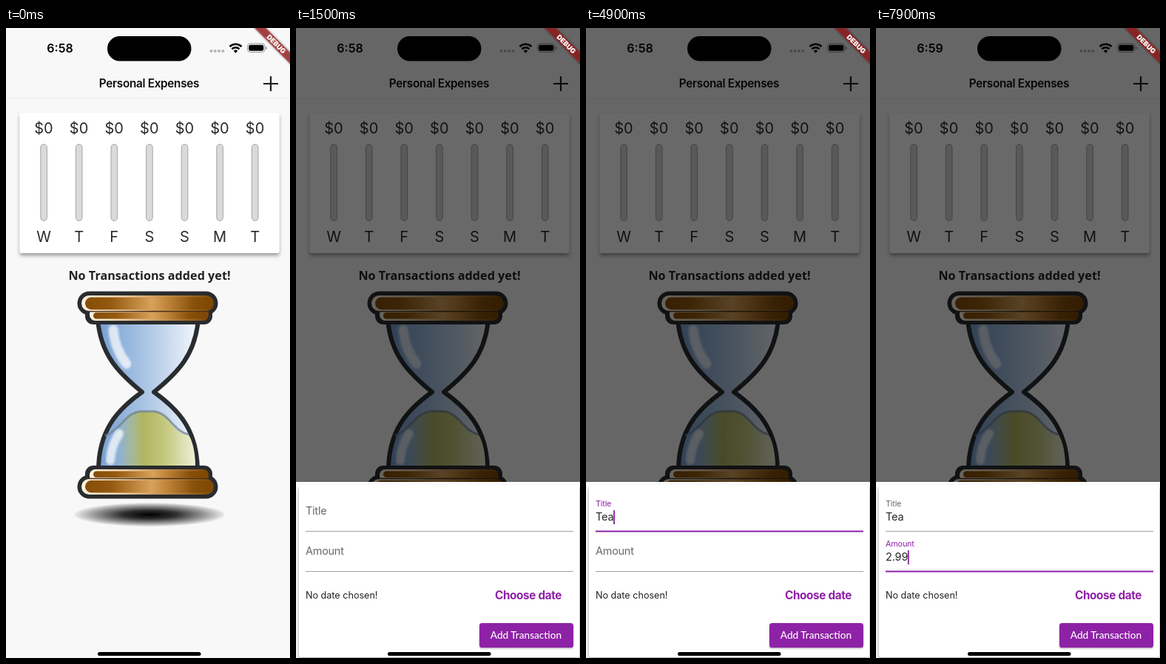
Animation, 384 px wide and 848 px high, one loop 8000 ms. Source, as an HTML page:

```html
<!DOCTYPE html>
<html lang="en">
<head>
<meta charset="utf-8">
<title>Personal Expenses</title>
<style>
  html, body { margin: 0; width: 100%; height: 100%; overflow: hidden; background: #f8f8f8; }
  svg { display: block; width: 384px; height: 848px; }
  text { font-family: Inter, Roboto, sans-serif; fill: #222; white-space: pre; }
  .mid { text-anchor: middle; }
  .day { font-size: 20px; fill: #2a2a2a; }
  .input { font-size: 14.4px; letter-spacing: -.1px; fill: #262626; }
  .label { font-size: 14.4px; letter-spacing: -.2px; }
  .purple { fill: #8e20a6; }
  .ink { stroke: #292c2f; stroke-width: 6; stroke-linejoin: round; }
</style>
</head>
<body>
<svg viewBox="0 0 384 848" xmlns="http://www.w3.org/2000/svg">
  <defs>
    <linearGradient id="wood">
      <stop offset="0" stop-color="#854d08"/><stop offset=".2" stop-color="#95590f"/>
      <stop offset=".52" stop-color="#d8a25c"/><stop offset=".64" stop-color="#c0853a"/>
      <stop offset=".85" stop-color="#87500a"/><stop offset="1" stop-color="#7d4703"/>
    </linearGradient>
    <linearGradient id="rim">
      <stop offset="0" stop-color="#fff3e2"/><stop offset=".3" stop-color="#ecd0a8"/>
      <stop offset=".6" stop-color="#c99452"/><stop offset="1" stop-color="#7d4703"/>
    </linearGradient>
    <linearGradient id="glass">
      <stop offset="0" stop-color="#759ed0"/><stop offset=".35" stop-color="#9cbbe0"/>
      <stop offset=".65" stop-color="#c2d5ec"/><stop offset="1" stop-color="#f5f8fc"/>
    </linearGradient>
    <linearGradient id="sand">
      <stop offset=".18" stop-color="#a9b45f" stop-opacity="0"/><stop offset=".45" stop-color="#b0b55f"/>
      <stop offset=".7" stop-color="#c6ca83"/><stop offset="1" stop-color="#eef0d6"/>
    </linearGradient>
    <radialGradient id="floor">
      <stop offset="0"/><stop offset=".35" stop-opacity=".82"/>
      <stop offset=".75" stop-opacity=".36"/><stop offset="1" stop-opacity=".04"/>
    </radialGradient>
    <filter id="lift" x="-10%" y="-10%" width="120%" height="125%">
      <feDropShadow dx="0" dy="3.5" stdDeviation="2.8" flood-opacity=".36"/>
    </filter>
    <filter id="low" x="-10%" y="-20%" width="120%" height="150%">
      <feDropShadow dx="0" dy="1.2" stdDeviation="1" flood-opacity=".32"/>
    </filter>
    <filter id="soft" x="-30%" y="-80%" width="160%" height="260%"><feGaussianBlur stdDeviation="1.5"/></filter>
    <g id="cap">
      <g fill="#292c2f">
        <rect x="107" y="372" width="172" height="27" rx="11"/>
        <rect x="96.5" y="354.5" width="190" height="32" rx="16"/>
      </g>
      <g fill="url(#rim)">
        <rect x="113" y="377" width="161" height="17" rx="8"/>
        <rect x="102" y="360" width="179" height="21" rx="10.5"/>
      </g>
      <path d="M112 381.5H273" stroke="#4a2f10" stroke-width="1.6"/>
      <rect x="118" y="383" width="154" height="8.5" rx="4.2" fill="url(#wood)"/>
      <rect x="107" y="362.5" width="173" height="16.5" rx="8.2" fill="url(#wood)"/>
    </g>
  </defs>

  <rect width="384" height="848" fill="#f8f8f8"/>
  <path d="M0 94.5H384" stroke="#e9e9e9"/>
  <text class="mid" x="193.5" y="80" font-size="15.3" font-weight="600" letter-spacing="-.3" style="fill:#0c0c0c">Personal Expenses</text>
  <path d="M348 75h20M358 65v20" stroke="#1c1c1c" stroke-width="2.2"/>

  <rect x="18.5" y="114" width="351" height="189" rx="3.5" fill="#fff" filter="url(#lift)"/>
  <g id="chart"></g>

  <text class="mid" x="194" y="339" font-size="16.2" font-weight="700" style="font-family:'Open Sans',sans-serif">No Transactions added yet!</text>

  <g>
    <ellipse cx="194" cy="655" rx="102" ry="16" fill="url(#floor)"/>
    <path class="ink" fill="url(#glass)" d="M124 392C128 440 152 464 184 490C150 514 125 542 125 596H259C259 542 234 514 200 490C232 464 256 440 260 392Z"/>
    <path d="M129 548C150 540 160 516 183 515H200C222 518 226 546 247 548Q256 562 256 593H128Q128 566 129 548Z" fill="url(#sand)"/>
    <path d="M134 549C156 540 162 517 183 516H200C222 519 226 543 247 547" fill="none" stroke="#71859a" stroke-width="3" stroke-opacity=".75"/>
    <g fill="none" stroke="#fff" stroke-linecap="round" filter="url(#soft)">
      <path d="M145 406Q147 432 163 452" stroke-width="13" stroke-opacity=".72"/>
      <path d="M153 546Q142 562 141 582" stroke-width="12" stroke-opacity=".72"/>
    </g>
    <use href="#cap"/>
    <use href="#cap" transform="matrix(1 0 0 -1 0 988)"/>
  </g>

  <rect id="scrim" width="384" height="848"/>

  <g id="sheet">
    <rect width="384" height="240" fill="#fcfcfc"/>
    <rect x="4" y="4" width="379" height="232" rx="3.6" fill="#fff" filter="url(#lift)"/>
    <g id="fields"></g>
    <text x="13" y="156.5" font-size="12.6">No date chosen!</text>
    <text class="mid purple" x="314" y="158" font-size="15.3" font-weight="700" letter-spacing="-.35">Choose date</text>
    <rect x="248" y="190" width="127" height="33" rx="3.6" fill="#8e20a6" filter="url(#low)"/>
    <text class="mid" x="311" y="211" font-size="13.6" font-weight="500" style="font-family:Lato,sans-serif;fill:#fff">Add Transaction</text>
  </g>

  <g>
    <text id="clock" class="mid" x="73" y="33" font-size="16" font-weight="600" style="fill:#000">6:58</text>
    <rect x="137" y="11" width="113.5" height="33.5" rx="16.75"/>
    <path d="M277.5 31h18" stroke="#000" stroke-opacity=".27" stroke-width="4" stroke-linecap="round" stroke-dasharray="0 5.3"/>
    <path d="M302.5 25a11.5 11.5 0 0 1 16 0M305.4 28.4a7.2 7.2 0 0 1 10.2 0" fill="none" stroke="#000" stroke-width="2.5"/>
    <path d="M307.8 30.8a4 4 0 0 1 5.4 0L310.5 33.8Z"/>
    <rect x="326.5" y="21" width="23.5" height="11.5" rx="3.6" fill="none" stroke="#000" stroke-opacity=".4"/>
    <rect x="328.2" y="22.7" width="20.1" height="8.1" rx="2.2"/>
    <path d="M351.3 25v4q1.6-.6 1.6-2t-1.6-2" fill-opacity=".45"/>
    <rect x="124" y="840" width="139.5" height="5" rx="2.5"/>
  </g>

  <g transform="translate(387 0) rotate(45)">
    <rect x="-36" y="25.2" width="72" height="10.8" fill-opacity=".5" filter="url(#soft)"/>
    <rect x="-36" y="25.2" width="72" height="10.8" fill="#b71c1c" fill-opacity=".63"/>
    <text class="mid" y="33.9" font-size="9.2" font-weight="900" style="fill:#fff">DEBUG</text>
  </g>
</svg>

<script>
const LOOP = 8000, STEP = 100, SHEET_H = 237;
const $ = id => document.getElementById(id);
const clamp = v => Math.min(1, Math.max(0, v));
const ramp = (t, start, length) => clamp((t - start) / length);
const smooth = u => u * u * (3 - 2 * u);

$('chart').innerHTML = [...'WTFSSMT'].map((day, i) => {
  const x = 51 + i * 47.6;
  return `<text class="day mid" x="${x}" y="141.5">$0</text>
    <rect x="${x - 4.2}" y="156.5" width="8.6" height="103" rx="4.3" fill="#dadada" stroke="#a4a4a4"/>
    <text class="day mid" x="${x}" y="288">${day}</text>`;
}).join('');

// y is the baseline of the resting label, relative to the sheet
const fields = [
  { name: 'Title', y: 44, focus: 2450, blur: 5050, keys: [[4400, 'T'], [4700, 'Te'], [4900, 'Tea']] },
  { name: 'Amount', y: 98, focus: 5050, blur: Infinity, keys: [[6200, '2'], [7100, '2.'], [7600, '2.9'], [7800, '2.99']] }
];

for (const f of fields) {
  const g = document.createElementNS('http://www.w3.org/2000/svg', 'g');
  g.innerHTML = `<path d="M13 ${f.y + 22.5}H375" stroke="#a2a2a2"/>
    <rect class="purple" x="13" y="${f.y + 21.5}" width="362" height="2"/>
    <text class="label">${f.name}</text>
    <text class="input" x="13" y="${f.y + 8}"></text>
    <rect class="purple" y="${f.y - 6}" width="1.8" height="19"/>`;
  $('fields').append(g);
  [, f.line, f.label, f.input, f.cursor] = g.children;
}

function blink(ms) {
  const c = ms % 1000;
  return c <= 500 ? 1 : c < 850 ? 1 - ramp(c, 500, 150) : ramp(c, 850, 150);
}

function drawField(f, t) {
  const float = smooth(ramp(t, f.focus, 200));
  const tint = start => smooth(ramp(t, start + 50, 150));
  const active = tint(f.focus) * (1 - tint(f.blur));
  f.label.setAttribute('transform', `translate(13 ${f.y - 11.5 * float}) scale(${1 - .25 * float})`);
  f.label.style.fill = `color-mix(in srgb, #8e20a6 ${active * 100}%, #686868)`;
  f.line.style.opacity = active;

  const [last, text] = f.keys.filter(k => k[0] <= t).pop() || [f.focus, ''];
  f.input.textContent = text;
  f.cursor.setAttribute('x', 12.6 + (text ? f.input.getComputedTextLength() : 0));
  f.cursor.style.opacity = t >= f.focus && t < f.blur ? blink(t - last) : 0;
}

function draw(now) {
  const t = Math.floor(now % LOOP / STEP) * STEP;
  const u = ramp(t, 1220, 280);
  const rise = 1 - (1 - u) ** 1.35;
  $('sheet').setAttribute('transform', `translate(0 ${Math.round(848 - SHEET_H * rise)})`);
  $('sheet').style.visibility = u ? 'visible' : 'hidden';
  $('scrim').style.opacity = .59 * smooth(u);
  $('clock').textContent = t < 5300 ? '6:58' : '6:59';
  fields.forEach(f => drawField(f, t));
  requestAnimationFrame(draw);
}
draw(performance.now());
</script>
</body>
</html>
```
